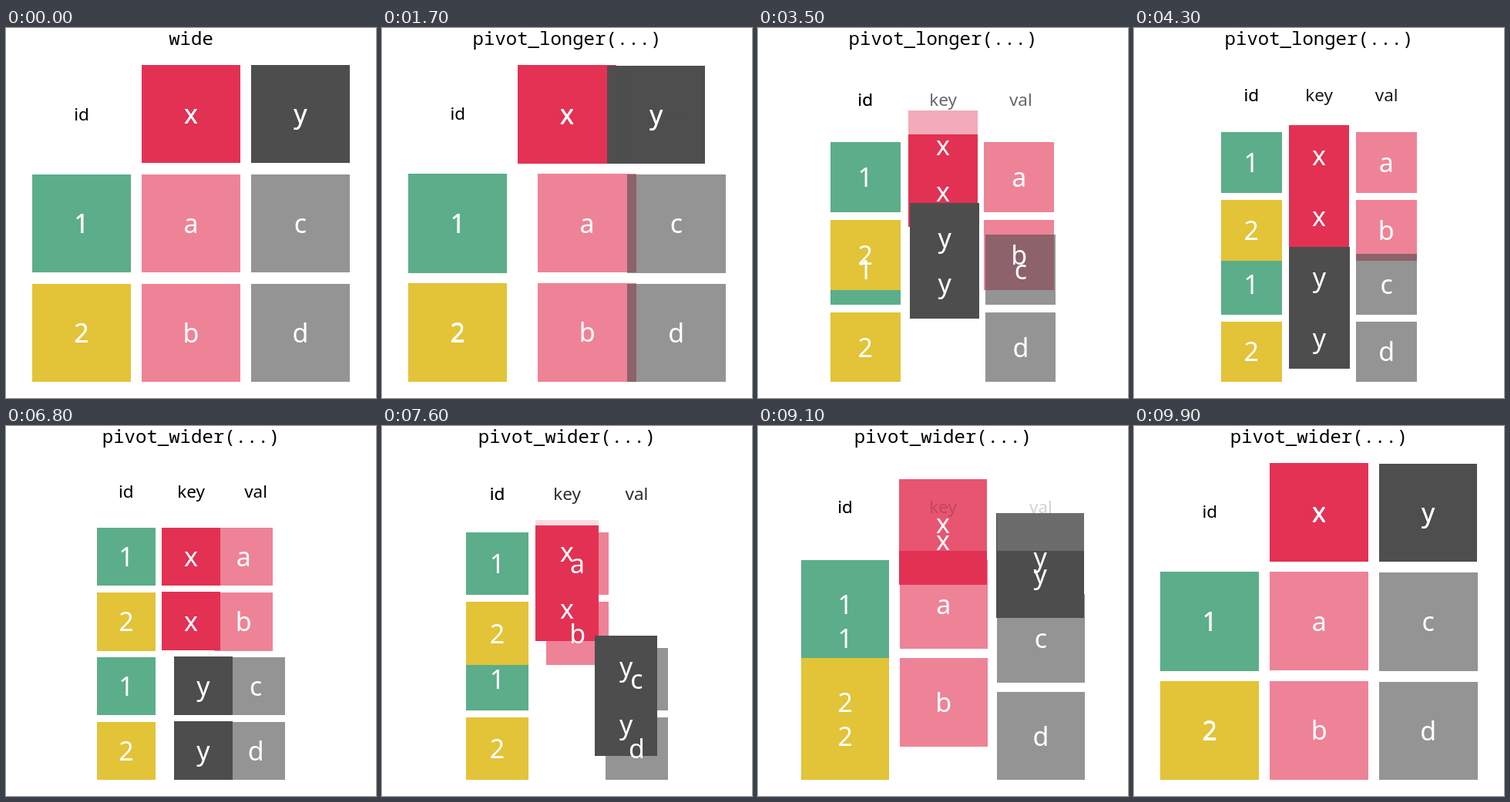
An HTML page for the animation above (10 s loop, 480 by 480 pixels).

```html
<!DOCTYPE html>
<html lang="en">
<head>
<meta charset="utf-8">
<title>Wide and long tables</title>
<style>
  html, body { margin: 0; width: 100%; height: 100%; overflow: hidden; background: #fff; }
  svg { display: block; width: 480px; height: 480px; }
  text { text-anchor: middle; font: 34px "Noto Sans", "Open Sans", sans-serif; fill: #fff; }
  .head { font-size: 22.5px; fill: #000; }
  #title { font: 24px "Noto Sans Mono", "DejaVu Sans Mono", monospace; fill: #000; }
</style>
</head>
<body>
<svg viewBox="0 0 480 480">
  <g id="tiles"><g id="ids"></g><g id="keys"></g><g id="vals"></g><g id="heads"></g></g>
  <g id="labels"></g>
  <text id="title" x="240" y="22"></text>
</svg>
<script>
const $ = id => document.getElementById(id);
const GREEN = '#5bae89', YELLOW = '#e3c338', RED = '#e33153', GRAY = '#4d4d4d';
const TOP = 47.6, HEIGHT = 411.8, MID = 240, TILE = 0.9;

// group, label, colour, [column, row] when wide, [column, row] when long
const cells = [
  ['ids', '1', GREEN, [-1, 1], [-1, 1]],
  ['ids', '1', GREEN, [-1, 1], [-1, 3]],
  ['ids', '2', YELLOW, [-1, 2], [-1, 2]],
  ['ids', '2', YELLOW, [-1, 2], [-1, 4]],
  ['keys', 'x', RED, [0, 0], [0, 1]],
  ['keys', 'x', RED, [0, 0], [0, 2]],
  ['keys', 'y', GRAY, [1, 0], [0, 3]],
  ['keys', 'y', GRAY, [1, 0], [0, 4]],
  ['vals', 'a', RED, [0, 1], [1, 1]],
  ['vals', 'b', RED, [0, 2], [1, 2]],
  ['vals', 'c', GRAY, [1, 1], [1, 3]],
  ['vals', 'd', GRAY, [1, 2], [1, 4]],
  ['heads', 'id', '#fff', [-1, 0], [-1, 0]],
  ['heads', 'id', '#fff', [-1, 0], [-1, 0]],
  ['heads', 'key', '#fff', [0, 0], [0, 0]],
  ['heads', 'val', '#fff', [1, 0], [1, 0]]
].map(([group, label, color, wide, long], i) => {
  const rect = add($(group), 'rect', { fill: color });
  const text = add($('labels'), 'text');
  text.textContent = label;
  const head = group === 'heads';
  if (head) text.setAttribute('class', 'head');
  if (group === 'vals') rect.setAttribute('fill-opacity', 0.6);
  return { rect, text, wide, long, head, fades: label === 'key' || label === 'val', extra: head && i === 13 };
});

function add(parent, tag, attrs = {}) {
  const el = document.createElementNS('http://www.w3.org/2000/svg', tag);
  set(el, attrs);
  return parent.appendChild(el);
}

function set(el, attrs) {
  for (const name in attrs) el.setAttribute(name, attrs[name]);
}

const mix = (a, b, p) => a + (b - a) * p;
const sineInOut = p => (1 - Math.cos(Math.PI * p)) / 2;
const expoOut = p => p <= 0 ? 0 : p >= 1 ? 1 : 1 - 2 ** (-10 * p);

// The picture advances in steps of 100 ms.
function phase(step) {
  if (step < 17) return ['wide', 0, false];
  if (step < 51) return ['pivot_longer(...)', (step - 16) / 34, false];
  if (step < 68) return ['long', 1, false];
  return ['pivot_wider(...)', (step - 67) / 33, true];
}

let shown = -1;

function draw(ms) {
  const step = Math.floor(ms / 100) % 100;
  if (step === shown) return;
  shown = step;

  const [title, p, back] = phase(step);
  const sine = sineInOut(p), expo = expoOut(p);
  const px = back ? 1 - expo : expo;
  const py = back ? 1 - sine : sine;
  const unit = HEIGHT / mix(2.9, 4.9, py);

  $('title').textContent = title;
  if (back) $('tiles').insertBefore($('vals'), $('keys'));
  else $('tiles').insertBefore($('keys'), $('vals'));

  for (const c of cells) {
    const x = MID + unit * mix(c.wide[0], c.long[0], px);
    const y = TOP + unit * (TILE / 2 + mix(c.wide[1], c.long[1], py));
    const half = unit * TILE / 2;
    const left = Math.round(x - half), top = Math.round(y - half);
    const alpha = c.fades ? py : c.extra ? 4 * py * (1 - py) : 1;
    set(c.rect, {
      x: left, y: top, opacity: alpha,
      width: Math.round(x + half) - left,
      height: Math.round(y + half) - top
    });
    set(c.text, { x, y: y + (c.head ? 8 : 12.5), opacity: alpha });
  }
}

function tick() {
  draw(performance.now());
  requestAnimationFrame(tick);
}
tick();
</script>
</body>
</html>
```
